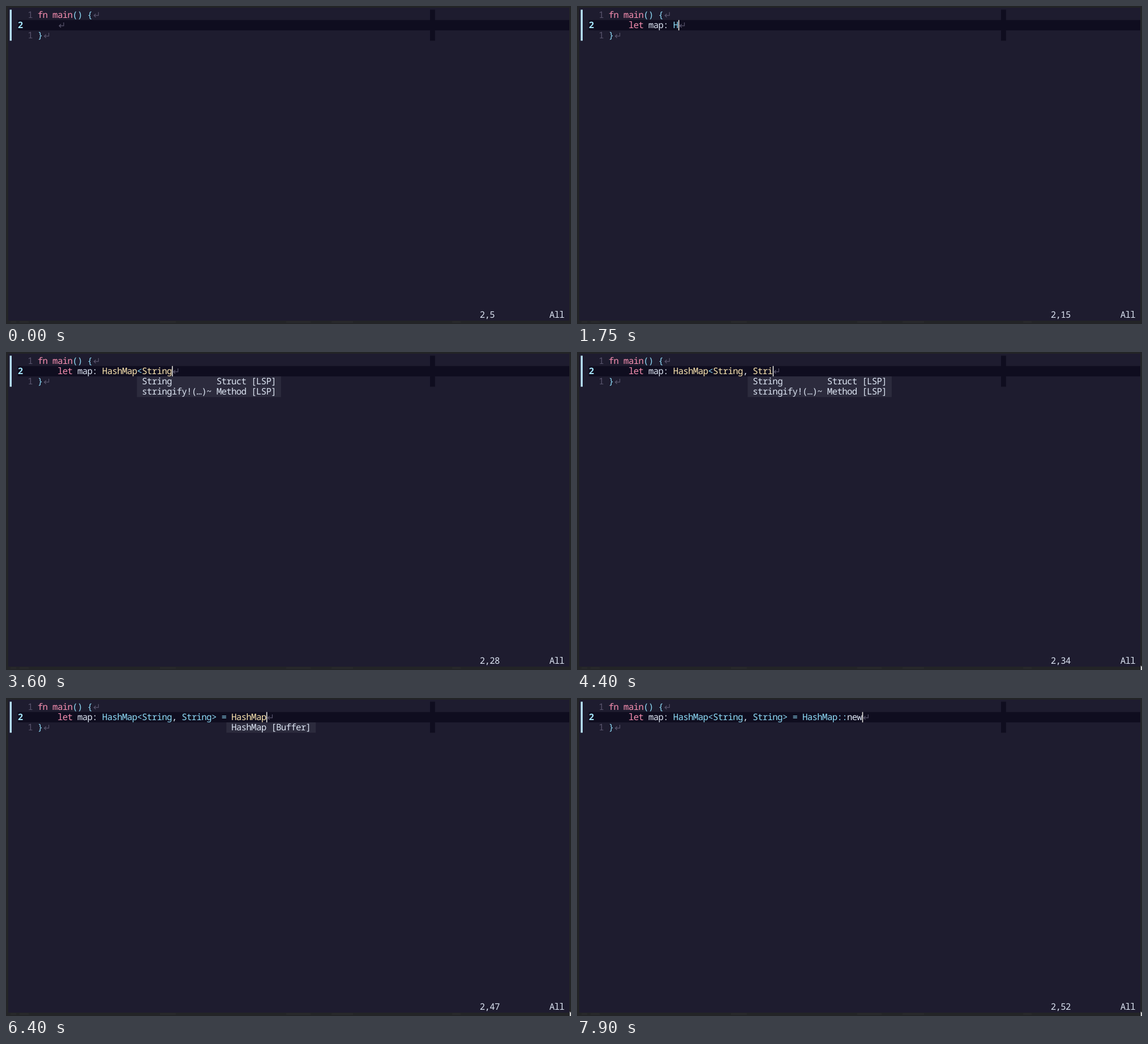
Recreate the animation shown at these times as an HTML page. Size 998 by 561 pixels, loop 8000 ms.

```html
<!DOCTYPE html>
<html lang="en">
<head>
<meta charset="utf-8">
<title>Typing in an editor</title>
<style>
  html, body { margin: 0; width: 100%; height: 100%; overflow: hidden; background: #232427; }
  svg { display: block; width: 998px; height: 561px; }
  text {
    font: 500 15.8px "Noto Sans Mono", "DejaVu Sans Mono", monospace;
    letter-spacing: calc(8.775px - 0.6em);
    white-space: pre;
    text-rendering: geometricPrecision;
  }
  .current { font-weight: 700; }
</style>
</head>
<body>
<svg id="stage" viewBox="0 0 998 561" xmlns="http://www.w3.org/2000/svg"></svg>
<script>
const LOOP = 8000, CELL = 8.775, ROW = 18.25, LEFT = 55.8, TOP = 6.5;
const C = {
  base: '#1e1c2f', line: '#0f0d1f', menu: '#2c2b3d', dim: '#58546c',
  white: '#dce4f2', red: '#f78fb0', sky: '#8fdcf8', yellow: '#fbe5b0',
  sign: '#b8e2fb', number: '#a6e6fb'
};

// Bursts of keys: first key time, last key time, keys (\b deletes).
const bursts = [
  [200, 550, 'let '], [700, 850, 'map'], [1300, 1600, ': '],
  [1750, 2100, 'Hash'], [2300, 2550, 'Map'], [2850, 2850, '<'],
  [3100, 3250, 'St'], [3400, 3600, 'ring'], [3750, 3900, ', '],
  [4050, 4150, 'St'], [4300, 4800, 'ring> '], [4950, 5000, '= '],
  [5500, 5700, 'Has'], [5850, 5850, 'h'], [6150, 6400, 'Map'],
  [6550, 6650, ';;'], [7050, 7200, '\b\b'], [7400, 7900, '::new']
];
const stringItems = ['String         Struct [LSP]', 'stringify!(…)~ Method [LSP]'];
const menus = [
  { from: 3250, to: 3750, col: 21, items: stringItems },
  { from: 4150, to: 4700, col: 29, items: stringItems },
  { from: 5700, to: 6550, col: 39, items: ['HashMap [Buffer]'] }
];
// Times when the pointer peeks in at the lower right corner.
const pointerShown = [[1300, 1750], [2050, 2300], [2700, 3100], [3750, 4050],
  [4300, 4700], [5350, 5600], [6000, 6900], [7100, 7450], [7750, LOOP]];

const stage = document.getElementById('stage');
const colX = col => LEFT + col * CELL;
const rowY = row => TOP + row * ROW;

function add(parent, tag, attrs, content) {
  const node = document.createElementNS('http://www.w3.org/2000/svg', tag);
  for (const key in attrs) node.setAttribute(key, attrs[key]);
  if (content) node.textContent = content;
  parent.appendChild(node);
  return node;
}
const rect = (parent, x, y, width, height, fill) =>
  add(parent, 'rect', { x, y, width, height, fill });
const label = (parent, col, row, fill, content) =>
  add(parent, 'text', { x: colX(col), y: rowY(row) + 14, fill }, content);
const place = (node, col, row) =>
  node.setAttribute('transform', `translate(${colX(col)} ${rowY(row)})`);
const show = (node, on) => node.setAttribute('visibility', on ? 'visible' : 'hidden');

function lineEnd(col, row) {
  const mark = add(stage, 'path', {
    d: 'M11 4.2V10.2H3M6.2 7.2L3 10.2L6.2 13.2',
    fill: 'none', stroke: C.dim, 'stroke-width': 1.2
  });
  place(mark, col, row);
  return mark;
}

function paint(text, runs) {
  text.replaceChildren();
  for (const [content, fill] of runs) add(text, 'tspan', { fill }, content);
}

rect(stage, 0, 0, 998, 561, '#232427');
for (const [x, w] of [[8, 10], [24, 16], [272, 28], [495, 43], [575, 38], [788, 15]])
  rect(stage, x, 556, w, 3, '#28292b');
rect(stage, 4, 3, 991, 552, C.base);
rect(stage, colX(79), TOP, CELL, ROW * 3, C.line);
rect(stage, colX(-4), rowY(1), 995 - colX(-4), ROW, C.line);
rect(stage, 6.6, TOP, 3.4, ROW * 3, C.sign);

label(stage, -2, 0, C.dim, '1');
label(stage, -4, 1, C.number, '2').setAttribute('class', 'current');
label(stage, -2, 2, C.dim, '1');
paint(label(stage, 0, 0, C.white), [['fn main', C.red], ['() {', C.sky]]);
label(stage, 0, 2, C.sky, '}');
lineEnd(11, 0);
lineEnd(1, 2);

const code = label(stage, 4, 1, C.white);
const codeEnd = lineEnd(4, 1);
const caret = rect(stage, 0.4, 0, 1.5, ROW, '#f1efea');
const ruler = label(stage, 89, 29, C.white);
label(stage, 103, 29, C.white, 'All');

for (const menu of menus) {
  menu.node = add(stage, 'g', {});
  const width = (menu.items[0].length + 2) * CELL;
  rect(menu.node, colX(menu.col - 1), rowY(2), width, ROW * menu.items.length, C.menu);
  menu.items.forEach((item, i) => label(menu.node, menu.col, 2 + i, C.white, item));
}
const pointer = add(stage, 'path', { d: 'M995.8 553L998 555.2V561H995.8Z', fill: '#d8d8d8' });

function typedAt(t) {
  let typed = '';
  for (const [start, end, keys] of bursts) {
    const step = (end - start) / Math.max(1, keys.length - 1);
    [...keys].forEach((key, i) => {
      if (t >= start + step * i) typed = key === '\b' ? typed.slice(0, -1) : typed + key;
    });
  }
  return typed;
}

function highlight(typed) {
  const openGeneric = typed.includes('<') && !typed.includes('>');
  const resolved = typed.includes('::');
  return typed.split(/(\blet\b|[A-Z]\w*|::|[<>=])/).filter(Boolean).map((part, i, all) => {
    if (part === 'let') return [part, C.red];
    if (/^(::|[<>=])$/.test(part)) return [part, C.sky];
    if (!/^[A-Z]/.test(part)) return [part, C.white];
    const isValue = all.slice(0, i).includes('=');
    return [part, openGeneric || (isValue && !resolved) ? C.yellow : C.sky];
  });
}

let lastTyped = null;
function render(t) {
  const typed = typedAt(t);
  if (typed !== lastTyped) {
    const col = 4 + typed.length;
    paint(code, highlight(typed));
    place(codeEnd, col, 1);
    place(caret, col, 1);
    ruler.textContent = `2,${col + 1}`;
    lastTyped = typed;
  }
  show(caret, t >= 50);
  for (const menu of menus) show(menu.node, t >= menu.from && t < menu.to);
  show(pointer, pointerShown.some(([from, to]) => t >= from && t < to));
}

const begin = performance.now();
function frame() {
  render((performance.now() - begin) % LOOP);
  requestAnimationFrame(frame);
}
frame();
</script>
</body>
</html>
```
